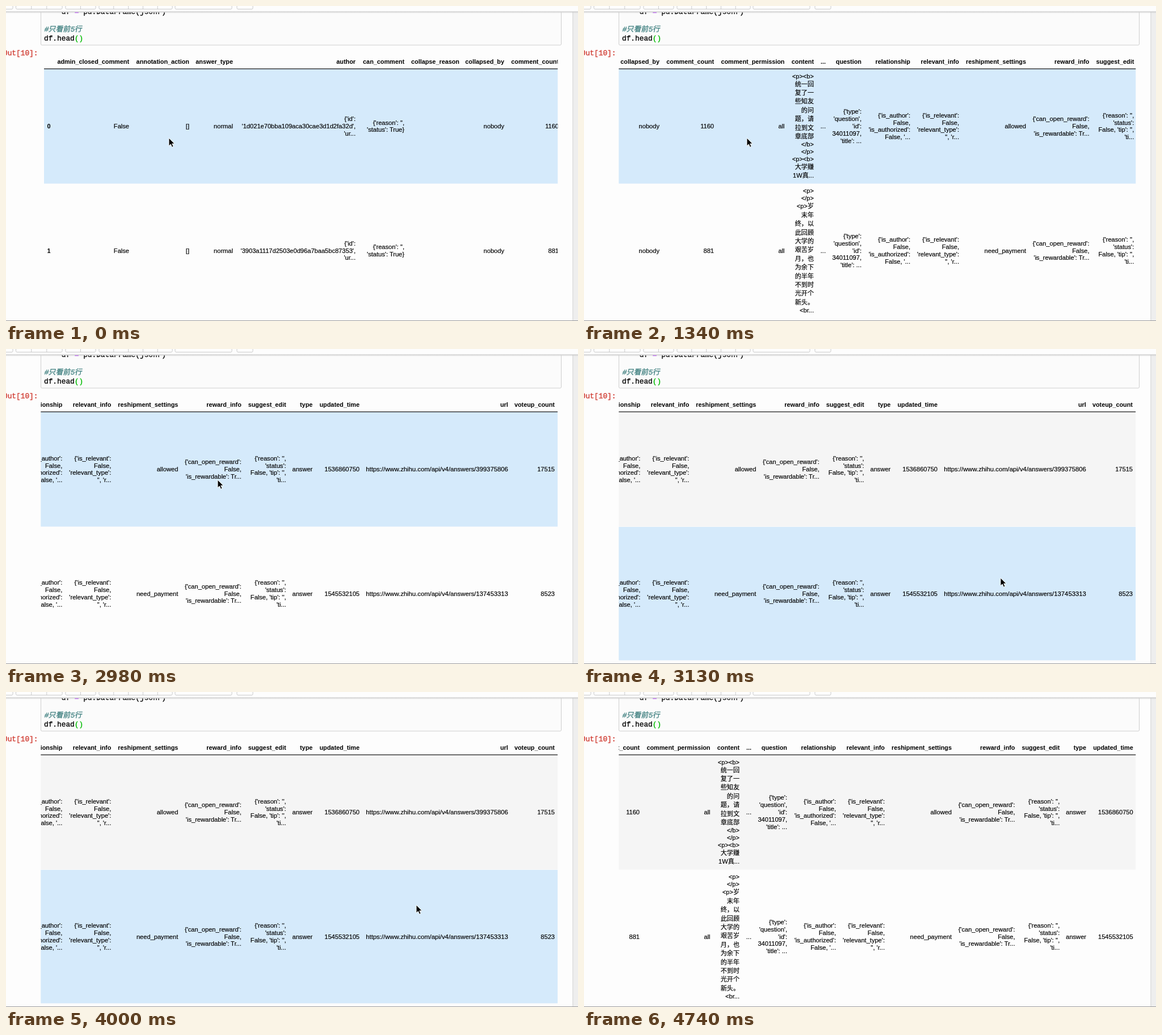
Recreate the animation shown at these times as an HTML page. Size 1008 by 556 pixels, loop 5.19 s.

```html
<!DOCTYPE html>
<html lang="zh">
<head>
<meta charset="utf-8">
<title>df.head()</title>
<style>
  html, body { margin: 0; width: 100%; height: 100%; overflow: hidden; background: #fdfdfd; }
  svg { display: block; width: 1008px; height: 556px; }
  text { white-space: pre; fill: currentColor; stroke: currentColor; stroke-width: .18px; }
  tspan { fill: currentColor; stroke: currentColor; }
  .cell { font: 11.1px "Liberation Sans", "Noto Sans CJK SC", "Noto Sans CJK", sans-serif; text-anchor: end; }
  .head { font-weight: bold; font-size: 10.85px; stroke: none; }
  .link { font-size: 11.3px; }
  .code { font: 12.8px "Liberation Mono", "Noto Sans CJK SC", "Noto Sans CJK", monospace; stroke-width: .35px; }
</style>
</head>
<body>
<svg viewBox="0 0 1008 556" xmlns="http://www.w3.org/2000/svg">
  <defs>
    <clipPath id="view"><rect x="61.3" y="88" width="911" height="467"/></clipPath>
    <clipPath id="page"><rect y="11" width="1008" height="545"/></clipPath>
    <linearGradient id="shade" x1="0" x2="0" y1="0" y2="1">
      <stop offset="0" stop-color="#c8c8c8"/><stop offset="1" stop-color="#c8c8c8" stop-opacity="0"/>
    </linearGradient>
  </defs>
  <rect width="1008" height="556" fill="#fdfdfd"/>
  <rect x="998" y="10" width="10" height="546" fill="#eee"/>
  <rect x="998" y="10" width="2" height="546" fill="#e2e2e2"/>
  <g clip-path="url(#page)">
    <rect x="61.5" y="-20" width="917" height="89" rx="2" fill="#fbfbfb" stroke="#cfcfcf"/>
    <text class="code" x="67" y="14">    df <tspan color="#a2f">=</tspan> pd.DataFrame(jsonr)</text>
    <text class="code" transform="translate(67 45) skewX(-12)" color="#408080">#只看前5行</text>
    <text class="code" x="67" y="60.5">df.head<tspan color="#0b0">()</tspan></text>
    <text class="code" x="-5" y="87" color="#d03a30">Out[10]:</text>
  </g>
  <rect width="1008" height="10" fill="#fdfdfd"/>
  <rect y="9.5" width="1008" height="3.5" fill="url(#shade)"/>
  <g id="tools" fill="#fff" stroke="#c9c9c9"></g>
  <g clip-path="url(#view)">
    <g id="table">
      <rect id="row0" x="67" y="111" width="2126" height="202.5"/>
      <rect id="row1" x="67" y="314" width="2126" height="235.5"/>
      <rect x="67" y="110.3" width="2126" height="1.2" fill="#111"/>
    </g>
  </g>
  <rect y="555" width="1008" height="1" fill="#9a9a9c"/>
  <path id="arrow" d="M0 0V14L3.3 11L5.6 16.2L8 15.1L5.7 10.1H10Z" fill="#000" stroke="#fff" stroke-width=".9"/>
  <path id="beam" d="M-3 -6.5Q0 -6.5 0 -4.5Q0 -6.5 3 -6.5M0 -5V5M-3 6.5Q0 6.5 0 4.5Q0 6.5 3 6.5M-1.5 2H1.5" fill="none" stroke="#000"/>
</svg>
<script>
const $ = id => document.getElementById(id);
const table = $('table');

function add(parent, tag, attrs, text) {
  const el = document.createElementNS('http://www.w3.org/2000/svg', tag);
  for (const k in attrs) el.setAttribute(k, attrs[k]);
  if (text) el.textContent = text;
  parent.append(el);
}

// Toolbar button groups: left, right, number of buttons
[[-14, 12, 1], [17.5, 99, 3], [105, 158, 2], [164, 293, 5], [298, 398, 1], [407, 435, 1]].forEach(([a, b, n]) => {
  add($('tools'), 'rect', { x: a, y: -15, width: b - a, height: 20.5, rx: 2 });
  for (let i = 1; i < n; i++) {
    const x = a + (b - a) * i / n;
    add($('tools'), 'path', { d: `M${x} 0V5.5` });
  }
});

// Columns: title, right edge, cell text of both rows ("|" breaks lines)
const author = id => `{'id':|'${id}',|'ur...`;
const link = id => 'https://www.zhihu.com/api/v4/answers/' + id;
const columns = [
  ['admin_closed_comment', 217, 'False'],
  ['annotation_action', 323, '[]'],
  ['answer_type', 400, 'normal'],
  ['author', 616, author('1d021e70bba109aca30cae3d1d2fa32d'), author('3903a1117d2503e0d96a7baa5bc87353')],
  ['can_comment', 702, "{'reason': '',|'status': True}"],
  ['collapse_reason', 799, ''],
  ['collapsed_by', 878, 'nobody'],
  ['comment_count', 974, '1160', '881'],
  ['comment_permission', 1098.5, 'all'],
  ['content', 1150,
    '<p><b>|统一回|复了一|些知友|的问|题，请|拉到文|章底部|</b>|</p>|<p><b>|大学赚|1W真...',
    '<p>|</p>|<p>岁|末年|终，以|此回顾|大学的|艰苦岁|月，也|为余下|的半年|不到时|光开个|新头。|<br...'],
  ['...', 1171, '...'],
  ['question', 1234, "{'type':|'question',|'id':|34011097,|'title': ..."],
  ['relationship', 1320, "{'is_author':|False,|'is_authorized':|False, '..."],
  ['relevant_info', 1406, "{'is_relevant':|False,|'relevant_type':|'', 'r..."],
  ['reshipment_settings', 1524, 'allowed', 'need_payment'],
  ['reward_info', 1635.5, "{'can_open_reward':|False,|'is_rewardable': Tr..."],
  ['suggest_edit', 1714.3, "{'reason': '',|'status':|False, 'tip': '',|'ti..."],
  ['type', 1761, 'answer'],
  ['updated_time', 1843.7, '1536860750', '1545532105'],
  ['url', 2105.5, link('399375806'), link('137453313')],
  ['voteup_count', 2187.7, '17515', '8523'],
];

function put(text, x, y, style = '') {
  add(table, 'text', { class: 'cell ' + style, x, y }, text);
}

function fill(text, x, mid, style) {
  const lines = text.split('|');
  const pitch = s => /[\u3000-\uffff]/.test(s) ? 15.4 : 12.8;
  let y = mid - lines.reduce((sum, s) => sum + pitch(s), 0) / 2;
  for (const s of lines) {
    const h = pitch(s);
    if (s) put(s, x, (y + h / 2 + 4).toFixed(1), style);
    y += h;
  }
}

const mids = [212, 431.6];
mids.forEach((y, i) => put(String(i), 78.5, y + 4.3, 'head'));
for (const [title, x, a, b = a] of columns) {
  put(title, x, 102.3, 'head');
  const style = title === 'url' ? 'link' : '';
  fill(a, x, mids[0], style);
  fill(b, x, mids[1], style);
}

// Stepped tracks: [time, value]
const scroll = [[0, 0], [300, 28], [450, 110], [600, 205], [740, 298], [890, 386], [1040, 505],
  [1190, 635], [1340, 745], [2080, 1121], [2230, 1220.7], [4290, 1190], [4440, 1040], [4590, 876]];
const pointer = [[0, [287, 233]], [2980, [373, 231]], [3130, [734, 404]], [3270, [766, 414]],
  [3420, [1003, 523]], [3560, [1004, 555]], [3710, null], [4000, [723, 376]], [4150, [674, 358]], [4740, null]];
const hover = [[0, 0], [3130, 1], [3420, -1], [4000, 1], [4740, -1]];
const shape = [[0, 'arrow'], [2080, 'beam'], [2230, 'arrow']];
const at = (track, t) => track.findLast(k => k[0] <= t)[1];

function draw(t) {
  table.setAttribute('transform', `translate(${-at(scroll, t)} 0)`);
  const lit = at(hover, t);
  ['#f5f5f5', '#fdfdfd'].forEach((c, i) => $('row' + i).setAttribute('fill', i === lit ? '#d5eafb' : c));
  const pos = at(pointer, t), kind = at(shape, t);
  for (const id of ['arrow', 'beam']) $(id).style.display = pos && id === kind ? '' : 'none';
  if (!pos) return;
  const [x, y] = kind === 'beam' ? [288.5, 235.5] : pos;
  $(kind).setAttribute('transform', `translate(${x} ${y})`);
}

const start = performance.now();
function tick() {
  draw((performance.now() - start) % 5190);
  requestAnimationFrame(tick);
}
tick();
</script>
</body>
</html>
```
